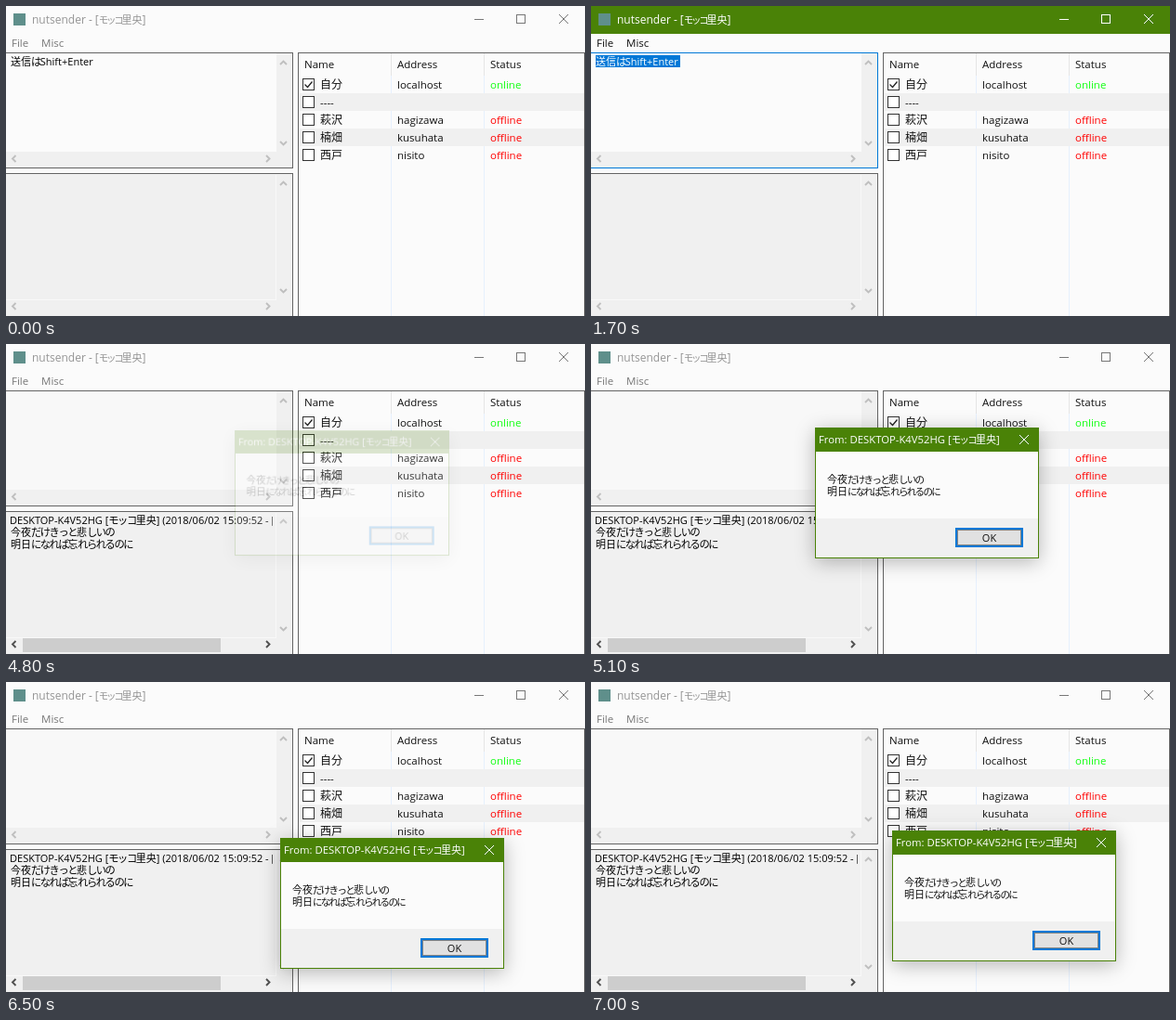
Animation, 623 px wide and 334 px high, one loop 8000 ms. Source, as an HTML page with a canvas:

```html
<!DOCTYPE html>
<html lang="ja">
<head>
<meta charset="utf-8">
<title>nutsender</title>
<style>
html, body { margin: 0; width: 100%; height: 100%; overflow: hidden; background: #fbfbfb; }
canvas { display: block; }
</style>
</head>
<body>
<canvas id="stage" width="623" height="334"></canvas>
<script>
const LOOP = 8000;
const GREEN = '#4a8207', BLUE = '#0078d7', PAPER = '#fbfbfb', FACE = '#f0f0f0', EDGE = '#646464';
const LATIN = '"Open Sans", sans-serif';
const CJK = '"Noto Sans CJK JP", "Noto Sans CJK", sans-serif';

// Text styles: Latin, kanji and kana sizes, kana advance
const UI = { latin: 11.5, kanji: 12, kana: 11, step: 9 };
const DIALOG_TEXT = { latin: 11.3, kanji: 11, kana: 10.5, step: 8.8 };
const TITLE = { latin: 12, kanji: 11, kana: 10.5, step: 8.2 };
const EDIT = { latin: 11, kanji: 11, kana: 11.3, step: 9.8 };

const USER = '[モッコ里央]';
const HOST = 'DESKTOP-K4V52HG';
const HINT = '送信はShift+Enter';
const MESSAGE = ['今夜だけきっと悲しいの', '明日になれば忘れられるのに'];
const CONTACTS = [
  ['自分', 'localhost', true],
  ['----', '', null],
  ['萩沢', 'hagizawa', false],
  ['楠畑', 'kusuhata', false],
  ['西戸', 'nisito', false]
];
const DRAG = [[244, 111], [271, 147], [295, 168], [310, 178], [320, 177], [326, 170], [325, 163], [324, 160]];
const FADE = [[0.18, 0.958], [0.72, 0.986], [0.94, 0.997], [1, 1]];
const DIALOG = { w: 241, h: 141, pad: 30 };

const stage = document.getElementById('stage').getContext('2d');
let ctx = stage;

function rect(x, y, w, h, color) {
  ctx.fillStyle = color;
  ctx.fillRect(x, y, w, h);
}

function frame(x, y, w, h, color, line = 1) {
  ctx.strokeStyle = color;
  ctx.lineWidth = line;
  ctx.strokeRect(x + line / 2, y + line / 2, w - line, h - line);
}

function path(points, color, line = 1) {
  ctx.strokeStyle = color;
  ctx.lineWidth = line;
  ctx.beginPath();
  points.forEach(([x, y]) => ctx.lineTo(x, y));
  ctx.stroke();
}

function cross(x, y, color) {
  path([[x - 5, y - 5], [x + 5, y + 5]], color);
  path([[x - 5, y + 5], [x + 5, y - 5]], color);
}

// Kana are set tighter than kanji, as in a proportional Japanese font
function text(str, x, y, color, style = UI) {
  ctx.fillStyle = color;
  for (const run of str.match(/[\u3040-\u30ff]+|[\u4e00-\u9fff]+|[^\u3040-\u30ff\u4e00-\u9fff]+/g) || []) {
    const kana = /[\u3040-\u30ff]/.test(run);
    const kanji = /[\u4e00-\u9fff]/.test(run);
    const size = kana ? style.kana : kanji ? style.kanji : style.latin;
    ctx.font = `${size}px ${kana || kanji ? CJK : LATIN}`;
    ctx.letterSpacing = kana ? `${style.step - size}px` : '0px';
    ctx.fillText(run, x, y);
    x += ctx.measureText(run).width;
  }
  ctx.letterSpacing = '0px';
}

function clipped(x, y, w, h, draw) {
  ctx.save();
  ctx.beginPath();
  ctx.rect(x, y, w, h);
  ctx.clip();
  draw();
  ctx.restore();
}

function chevron(x, y, dx, dy, color) {
  path([
    [x - 2 * dx - 3.5 * dy, y - 2 * dy - 3.5 * dx],
    [x + 1.5 * dx, y + 1.5 * dy],
    [x - 2 * dx + 3.5 * dy, y - 2 * dy + 3.5 * dx]
  ], color, 1.9);
}

function scrollbars(top, bottom, scrollable) {
  const off = '#bfbfbf', side = scrollable ? '#505050' : off;
  rect(291, top + 1, 17, bottom - top - 1, FACE);
  rect(0, bottom - 17, 308, 17, FACE);
  if (scrollable) rect(18, bottom - 16, 213, 15, '#cdcdcd');
  chevron(298.5, top + 11, 0, -1, off);
  chevron(298.5, bottom - 26, 0, 1, off);
  chevron(8.5, bottom - 9.5, -1, 0, side);
  chevron(282, bottom - 9.5, 1, 0, side);
}

function titleBar(active) {
  const ink = active ? '#fff' : '#959595';
  const mark = active ? '#fff' : '#777';
  rect(0, 0, 623, 30, active ? GREEN : PAPER);
  rect(8, 8, 13, 13, '#5f8f8b');
  text('nutsender - ' + USER, 28, 19, ink, TITLE);
  rect(504, 14, 10, 1, mark);
  frame(549, 9, 10, 10, mark);
  cross(600, 14, mark);
  rect(0, 30, 623, 20, PAPER);
  const menu = active ? '#111' : '#777';
  text('File', 6, 44, menu);
  text('Misc', 38, 44, menu);
}

function contactList(headerHot) {
  rect(314, 50, 309, 284, PAPER);
  if (headerHot) rect(415, 51, 99, 24, '#d9ebf9');
  for (const x of [414, 514]) {
    rect(x, 51, 1, 24, '#e5e5e5');
    rect(x, 75, 1, 259, '#e6f0fd');
  }
  ['Name', 'Address', 'Status'].forEach((s, i) => text(s, [321, 421, 521][i], 67, '#111'));
  CONTACTS.forEach(([name, address, online], i) => {
    const y = 75 + 19 * i;
    if (i % 2) rect(315, y, 307, 19, FACE);
    rect(319, y + 3, 13, 13, '#fff');
    frame(319, y + 3, 13, 13, '#333');
    if (i === 0) path([[321.5, y + 9.5], [324.5, y + 12.5], [329.5, y + 6.5]], '#222', 1.3);
    text(name, 338, y + 14, '#111');
    text(address, 421, y + 14, '#111');
    if (online !== null) text(online ? 'online' : 'offline', 521, y + 14, online ? '#1f1' : '#f00');
  });
  frame(314, 50, 309, 300, EDGE);
}

function inputBorder(t) {
  if (t >= 1000 && t < 4800) return BLUE;
  if (t >= 600 && t < 1000) return '#171717';
  return t >= 500 && t < 600 ? '#404040' : EDGE;
}

function inputPane(t) {
  const sent = t >= 4700;
  rect(0, 50, 309, 125, sent ? '#f8f8f8' : PAPER);
  scrollbars(50, 174, false);
  if (t < 2800) {
    text(HINT, 5, 64, '#000', EDIT);
    if (t >= 1000 && t < 1500) rect(95, 53, 1, 13, '#000');
    if (t >= 1500) {
      const left = t < 1600 ? 62 : t < 1700 ? 21 : 5;
      clipped(left, 53, 96 - left, 13, () => {
        rect(left, 53, 96 - left, 13, BLUE);
        text(HINT, 5, 64, '#fff', EDIT);
      });
      if (t >= 2300) rect(5, 53, 1, 13, '#ff8728');
    }
  } else if (!sent) {
    MESSAGE.forEach((s, i) => text(s, 5, 64 + 13 * i, '#000', EDIT));
    if (Math.floor((t - 2800) / 500) % 2 === 0) rect(139, 66, 1, 13, '#000');
  }
  // The left border lies outside the stage
  frame(-1, 50, 310, 125, inputBorder(t));
}

function logPane(filled) {
  rect(0, 180, 309, 154, FACE);
  scrollbars(180, 333, filled);
  rect(290, 182, 1, 134, '#f8f8f8');
  rect(0, 316, 291, 1, '#f8f8f8');
  if (filled) {
    clipped(2, 182, 285, 134, () => {
      text(`${HOST} ${USER} (2018/06/02 15:09:52 - [`, 4, 194, '#000', EDIT);
      MESSAGE.forEach((s, i) => text(s, 5, 207 + 13 * i, '#000', EDIT));
    });
  }
  frame(-1, 180, 310, 170, EDGE);
}

function makeDialog() {
  const { w, h, pad } = DIALOG;
  const layer = document.createElement('canvas');
  layer.width = w + 2 * pad;
  layer.height = h + 2 * pad;
  ctx = layer.getContext('2d');
  ctx.translate(pad, pad);
  ctx.shadowColor = 'rgba(0,0,0,0.28)';
  ctx.shadowBlur = 20;
  ctx.shadowOffsetY = 4;
  rect(0, 0, w, h, GREEN);
  ctx.shadowColor = 'transparent';
  rect(1, 26, w - 2, 72, PAPER);
  rect(1, 98, w - 2, h - 99, FACE);
  text(`From: ${HOST} ${USER}`, 4, 17, '#fff', DIALOG_TEXT);
  cross(225, 13, '#fff');
  MESSAGE.forEach((s, i) => text(s, 13, 60 + 13 * i, '#111', DIALOG_TEXT));
  rect(151, 108, 73, 21, '#e1e1e1');
  frame(151, 108, 73, 21, BLUE, 2);
  ctx.setLineDash([1, 1]);
  frame(153, 110, 69, 17, '#222');
  ctx.setLineDash([]);
  ctx.textAlign = 'center';
  ctx.fillStyle = '#111';
  ctx.font = `11px ${LATIN}`;
  ctx.fillText('OK', 187.5, 123);
  ctx = stage;
  return layer;
}

function showDialog(t) {
  const [alpha, scale] = FADE[Math.min(3, Math.floor((t - 4800) / 100))];
  const [x, y] = t < 6300 ? [241, 90] : DRAG[Math.min(7, Math.floor((t - 6300) / 100))];
  ctx.save();
  ctx.globalAlpha = alpha;
  ctx.translate(x + DIALOG.w / 2, y + DIALOG.h / 2);
  ctx.scale(scale, scale);
  ctx.drawImage(dialog, -dialog.width / 2, -dialog.height / 2);
  ctx.restore();
}

const dialog = makeDialog();
const start = performance.now();

function render() {
  const t = Math.max(0, performance.now() - start) % LOOP;
  rect(0, 0, 623, 334, PAPER);
  titleBar(t >= 1000 && t < 4800);
  inputPane(t);
  logPane(t >= 4700);
  contactList(t >= 500 && t < 600);
  if (t >= 4800) showDialog(t);
  requestAnimationFrame(render);
}
render();
</script>
</body>
</html>
```
